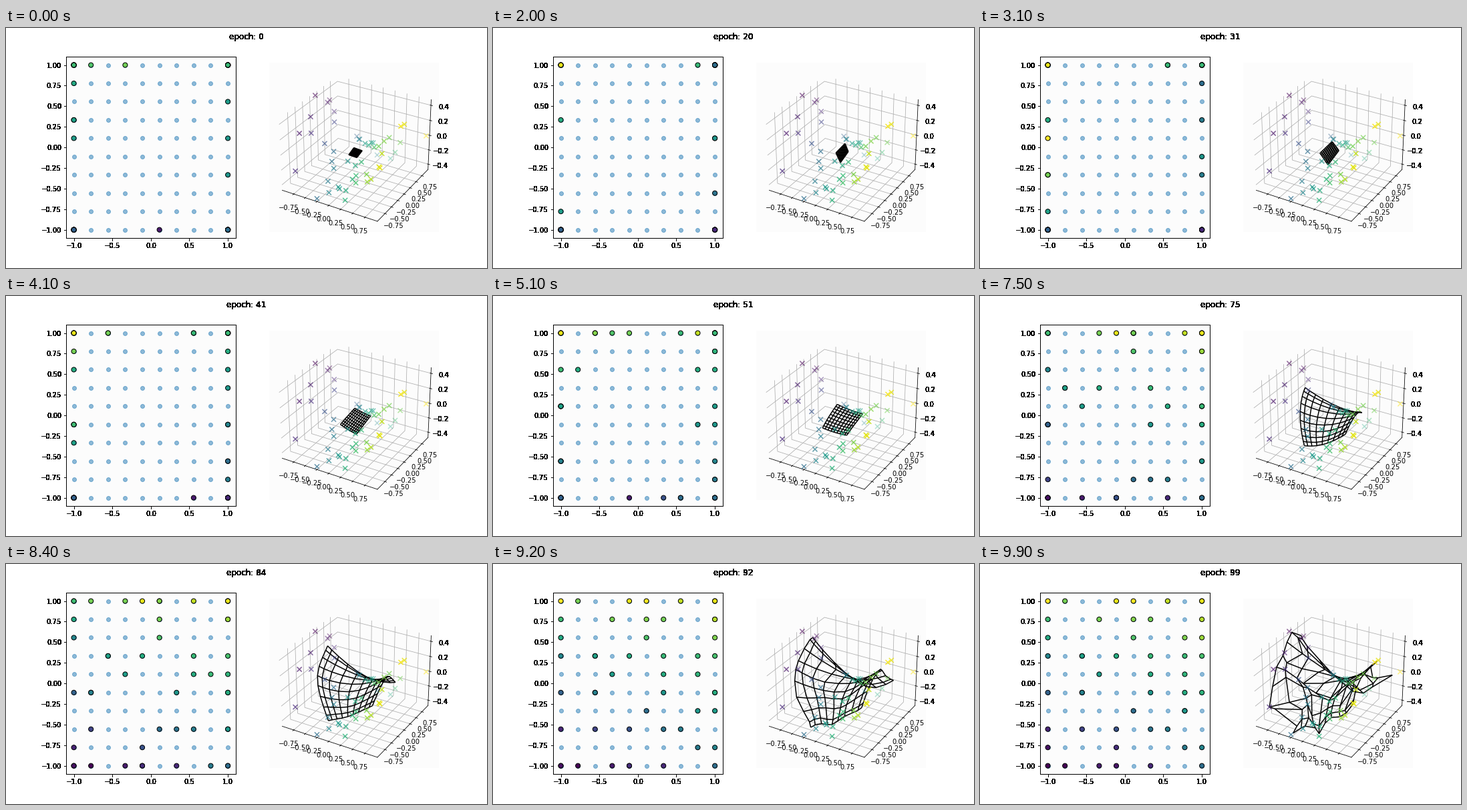
These frames come from a looping animation (720x360 px, 10000 ms). A matplotlib script:

```python
import numpy as np
import matplotlib.pyplot as plt
from matplotlib.animation import FuncAnimation
from mpl_toolkits.mplot3d.art3d import Line3DCollection

W, H, DPI = 720, 360, 72
EPOCHS, SIDE, SAMPLES = 100, 10, 50
SIGMA_MAX, SIGMA_MIN = 2.2, 0.1
PAPER = "#fcfcfc"


def make_data():
    """Random samples on a saddle surface."""
    np.random.seed(0)
    x = np.random.uniform(-1, 1, SAMPLES)
    y = np.random.uniform(-1, 1, SAMPLES)
    return np.c_[x, y, (x**2 - y**2) / 2]


def nearest(data, weights):
    return ((data[:, None] - weights)**2).sum(-1).argmin(1)


def train(data, units):
    """Batch self-organising map with a linearly shrinking neighbourhood."""
    gap = ((units[:, None] - units)**2).sum(-1)
    a, b = units.T
    weights = data.mean(0) + 0.1 * np.c_[b, -a, 0 * a]
    winners = nearest(data, weights)
    for epoch in range(EPOCHS):
        sigma = SIGMA_MAX - (SIGMA_MAX - SIGMA_MIN) * epoch / EPOCHS
        pull = np.exp(-gap[winners] / (2 * sigma**2))
        weights = pull.T @ data / pull.sum(0)[:, None]
        winners = nearest(data, weights)
        yield winners, weights


def mesh_lines(weights):
    net = weights.reshape(SIDE, SIDE, 3)
    return np.concatenate([net, net.transpose(1, 0, 2)])


def padded(values):
    pad = np.ptp(values) / 48
    return values.min() - pad, values.max() + pad


def harden(img, dpi):
    """Turn soft edges into solid pixels."""
    out = img.copy()
    out[..., 3] = img[..., 3] > 0.03
    return out, 0, 0


data = make_data()
axis = np.linspace(-1, 1, SIDE)
units = np.stack(np.meshgrid(axis, axis), -1).reshape(-1, 2)
states = list(train(data, units))

fig = plt.figure(figsize=(W / DPI, H / DPI), dpi=DPI, facecolor="white")
fig.subplots_adjust(left=0.125, right=0.9, bottom=0.125, top=0.88, wspace=0.2)
title = fig.suptitle("epoch: 0")

# Map units, with the winners of the samples on top.
flat = fig.add_subplot(121, facecolor=PAPER)
flat.set(xlim=(-1.1, 1.1), ylim=(-1.1, 1.1),
         xticks=np.linspace(-1, 1, 5), yticks=np.linspace(-1, 1, 9))
flat.scatter(*units.T, color="#1f77b4", alpha=0.5)
hits = flat.scatter(*units[states[0][0]].T, s=50, c=data[:, 0], cmap="viridis",
                    edgecolors="k", linewidths=1, zorder=3)

# Samples and the fitted net in data space.
space = fig.add_subplot(122, projection="3d", facecolor=PAPER)
space.scatter(*data.T, c=data[:, 0], cmap="viridis", marker="x", s=50)
wire = Line3DCollection(mesh_lines(states[0][1]), colors="k", linewidths=1.5)
space.add_collection3d(wire)
quarters = np.linspace(-0.75, 0.75, 7)
space.set(xticks=quarters, yticks=quarters, zticks=np.linspace(-0.4, 0.4, 5))
space.set(**{f"{name}lim": padded(col) for name, col in zip("xyz", data.T)})
for side in (space.xaxis, space.yaxis, space.zaxis):
    side.set_pane_color(PAPER)

for part in [title, *flat.spines.values(),
             *flat.get_xticklabels(), *flat.get_yticklabels(),
             *flat.get_xticklines(), *flat.get_yticklines(),
             *space.get_zticklabels()]:
    part.set_agg_filter(harden)


def update(epoch):
    winners, weights = states[epoch]
    title.set_text(f"epoch: {epoch}")
    hits.set_offsets(units[winners])
    wire.set_segments(mesh_lines(weights))
    return title, hits, wire


anim = FuncAnimation(fig, update, frames=EPOCHS, interval=100,
                     init_func=lambda: update(0), repeat=True, repeat_delay=0)
plt.show()
```
